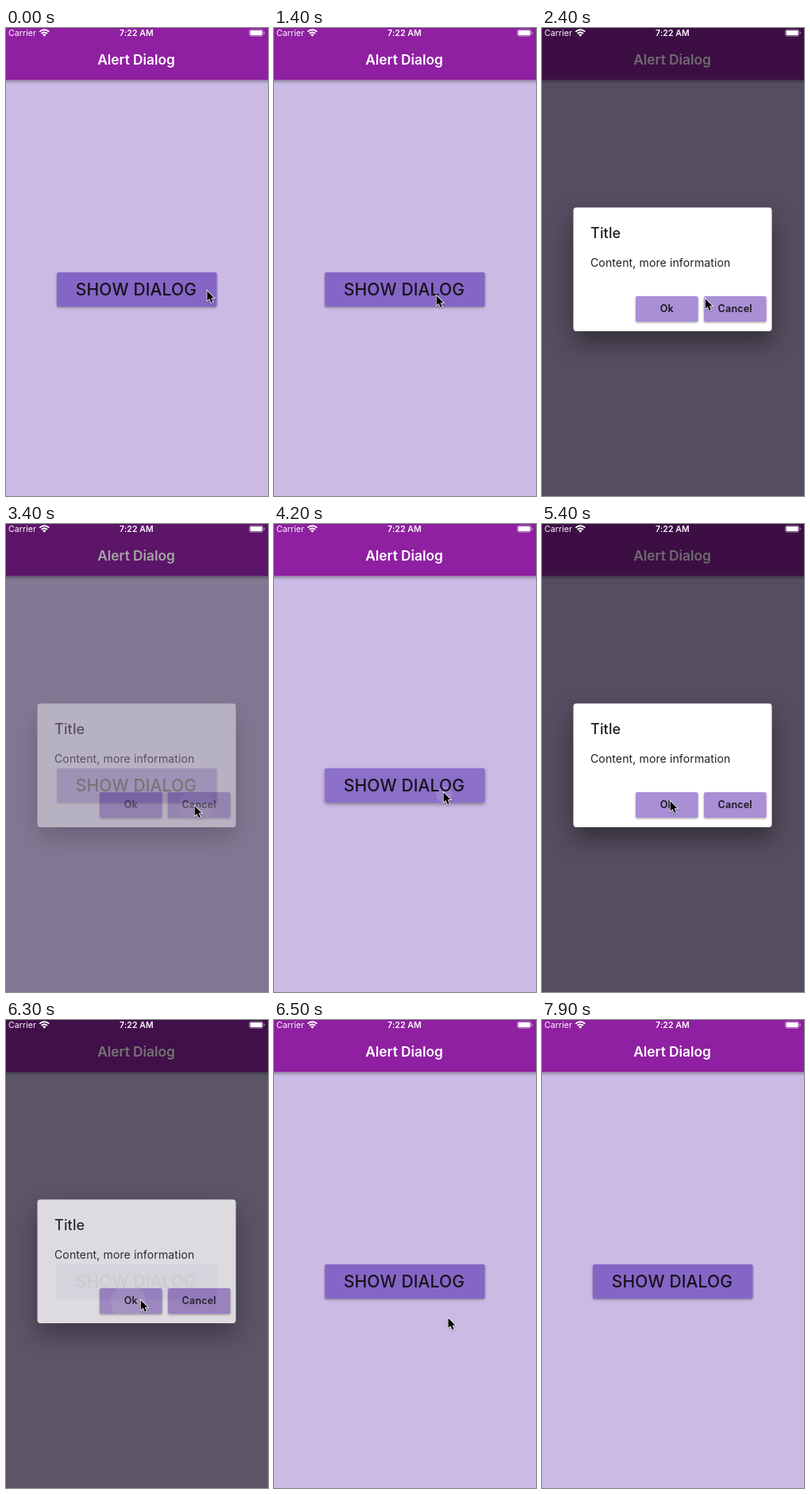
Animation of 330 by 588 pixels, one loop 8 s. Source, as an HTML page with a canvas:

```html
<!DOCTYPE html>
<html lang="en">
<head>
<meta charset="utf-8">
<title>Alert Dialog</title>
<style>
html, body { margin: 0; width: 100%; height: 100%; overflow: hidden; background: #cabae4; }
canvas { display: block; width: 330px; height: 588px; }
</style>
</head>
<body>
<canvas id="stage"></canvas>
<script>
const W = 330, H = 588, LOOP = 8000, FADE = 150;
const FONT = 'Inter, Roboto, sans-serif';
const scale = window.devicePixelRatio || 1;

function makeLayer(canvas) {
  canvas.width = W * scale;
  canvas.height = H * scale;
  const c = canvas.getContext('2d');
  c.scale(scale, scale);
  return c;
}

const stage = makeLayer(document.getElementById('stage'));
const layer = makeLayer(document.createElement('canvas'));

// Places the pointer rests at, and when it glides there
const home = { x: 253, y: 329 };
const moves = [
  { from: 0, to: 400, x: 204, y: 335 },
  { from: 1900, to: 2000, x: 205, y: 339 },
  { from: 2400, to: 3000, x: 237, y: 353 },
  { from: 3450, to: 4100, x: 213, y: 336 },
  { from: 4500, to: 4900, x: 195, y: 355 },
  { from: 5000, to: 5200, x: 161, y: 347 },
  { from: 6280, to: 6600, x: 225, y: 376 },
  { from: 6800, to: 7100, x: 330, y: 470 }
];

// Each visit of the dialog: fade-in start, fade-out start, button tapped
const visits = [
  { open: 1550, close: 3315, tap: 'Cancel' },
  { open: 4255, close: 6270, tap: 'Ok' }
];

const clamp = v => Math.max(0, Math.min(1, v));
const easeOut = k => 1 - (1 - k) ** 2;

function pointerAt(t) {
  let { x, y } = home;
  for (const m of moves) {
    const k = easeOut(clamp((t - m.from) / (m.to - m.from)));
    x += (m.x - x) * k;
    y += (m.y - y) * k;
  }
  return { x, y };
}

function text(c, str, x, y, size, weight, color, spacing = 0, align = 'left') {
  c.font = `${weight} ${size}px ${FONT}`;
  c.letterSpacing = spacing + 'px';
  c.textAlign = align;
  c.fillStyle = color;
  c.fillText(str, x, y);
}

function shadow(c, color = 'transparent', blur = 0, dy = 0) {
  c.shadowColor = color;
  c.shadowBlur = blur * scale;
  c.shadowOffsetY = dy * scale;
}

function box(c, x, y, w, h, r, color) {
  c.beginPath();
  c.roundRect(x, y, w, h, r);
  c.fillStyle = color;
  c.fill();
}

function raised(c, x, y, w, h, r, color, blur, dy, dark) {
  shadow(c, `rgba(0,0,0,${dark})`, blur, dy);
  box(c, x, y, w, h, r, color);
  shadow(c);
}

function splash(c, x, y, w, h, cx, cy, radius) {
  c.save();
  c.beginPath();
  c.roundRect(x, y, w, h, 2);
  c.clip();
  c.fillStyle = 'rgba(255,255,255,0.06)';
  c.fillRect(x, y, w, h);
  c.beginPath();
  c.arc(cx, cy, radius, 0, 7);
  c.fillStyle = 'rgba(255,255,255,0.13)';
  c.fill();
  c.restore();
}

function drawPage(c, t) {
  c.fillStyle = '#cabae4';
  c.fillRect(0, 0, W, H);
  raised(c, -10, -10, W + 20, 75, 0, '#8f20a1', 4, 1.5, 0.38);
  text(c, 'Alert Dialog', 164, 46, 17.3, 600, '#fff', 0, 'center');

  const hit = visits.find(v => t >= v.open - 60 && t < v.open + FADE);
  raised(c, 64, 307, 201.5, 43, 2, '#8566c6', hit ? 5 : 3, hit ? 2 : 1.3, 0.36);
  if (hit) {
    const p = pointerAt(t);
    splash(c, 64, 307, 201.5, 43, p.x + 1, p.y + 4, 9 + (t - hit.open + 60) * 0.2);
  }
  text(c, 'SHOW DIALOG', 164, 336, 21, 500, '#17121c', 0.15, 'center');
}

function dialogButton(c, label, x, hit) {
  raised(c, x, 337, 78.5, 32, 2, '#a98fd5', 3, 1.3, 0.36);
  if (hit) splash(c, x, 337, 78.5, 32, x + 36, 355, 22);
  text(c, label, x + 39.2, 357, 12.5, 600, '#1c1722', 0.2, 'center');
}

function drawDialog(c, hit) {
  c.clearRect(0, 0, W, H);
  raised(c, 39.5, 225.5, 250, 155.5, 4, '#fff', 30, 14, 0.42);
  text(c, 'Title', 61, 264, 18, 500, '#211d25', 0.15);
  text(c, 'Content, more information', 61, 299.5, 14, 400, '#211d25', 0.13);
  dialogButton(c, 'Ok', 118, hit === 'Ok');
  dialogButton(c, 'Cancel', 204, hit === 'Cancel');
}

function drawStatus(c) {
  text(c, 'Carrier', 3, 10, 10.5, 400, '#fff', 0.1);
  text(c, '7:22 AM', 164.5, 10, 10.5, 600, '#fff', 0.1, 'center');

  c.strokeStyle = c.fillStyle = '#fff';
  c.lineWidth = 2;
  for (const r of [5.2, 8.4]) {
    c.beginPath();
    c.arc(48.3, 10.6, r, -Math.PI * 0.75, -Math.PI * 0.25);
    c.stroke();
  }
  c.beginPath();
  c.moveTo(48.3, 10.8);
  c.arc(48.3, 10.8, 3.2, -Math.PI * 0.75, -Math.PI * 0.25);
  c.fill();

  c.lineWidth = 0.8;
  c.globalAlpha = 0.5;
  c.beginPath();
  c.roundRect(306.4, 1.9, 17.4, 8.4, 2.4);
  c.stroke();
  box(c, 324.6, 4.6, 1.2, 3, 0.6, '#fff');
  c.globalAlpha = 1;
  box(c, 307.5, 3, 15.2, 6.2, 1.3, '#fff');
}

function drawPointer(c, { x, y }) {
  c.save();
  c.translate(x + 0.6, y + 1.2);
  c.scale(0.86, 0.86);
  const arrow = new Path2D('M0 0V14.4L3.4 11.3L5.9 17.2L8.3 16.2L5.9 10.5H10.3Z');
  shadow(c, 'rgba(0,0,0,0.3)', 2, 1);
  c.lineWidth = 1.8;
  c.strokeStyle = '#fff';
  c.stroke(arrow);
  shadow(c);
  c.fillStyle = '#000';
  c.fill(arrow);
  c.restore();
}

function draw(t) {
  drawPage(stage, t);
  for (const v of visits) {
    const a = clamp((t - v.open) / FADE) * clamp(1 - (t - v.close) / FADE);
    if (!a) continue;
    stage.fillStyle = `rgba(0,0,0,${0.575 * Math.sin(a * Math.PI / 2)})`;
    stage.fillRect(0, 0, W, H);
    drawDialog(layer, t >= v.close - 30 ? v.tap : '');
    stage.globalAlpha = a;
    stage.drawImage(layer.canvas, 0, 0, W, H);
    stage.globalAlpha = 1;
  }
  drawStatus(stage);
  if (t < 7080) drawPointer(stage, pointerAt(t));
}

const start = performance.now();
function frame() {
  draw((performance.now() - start) % LOOP);
  requestAnimationFrame(frame);
}
frame();
</script>
</body>
</html>
```
